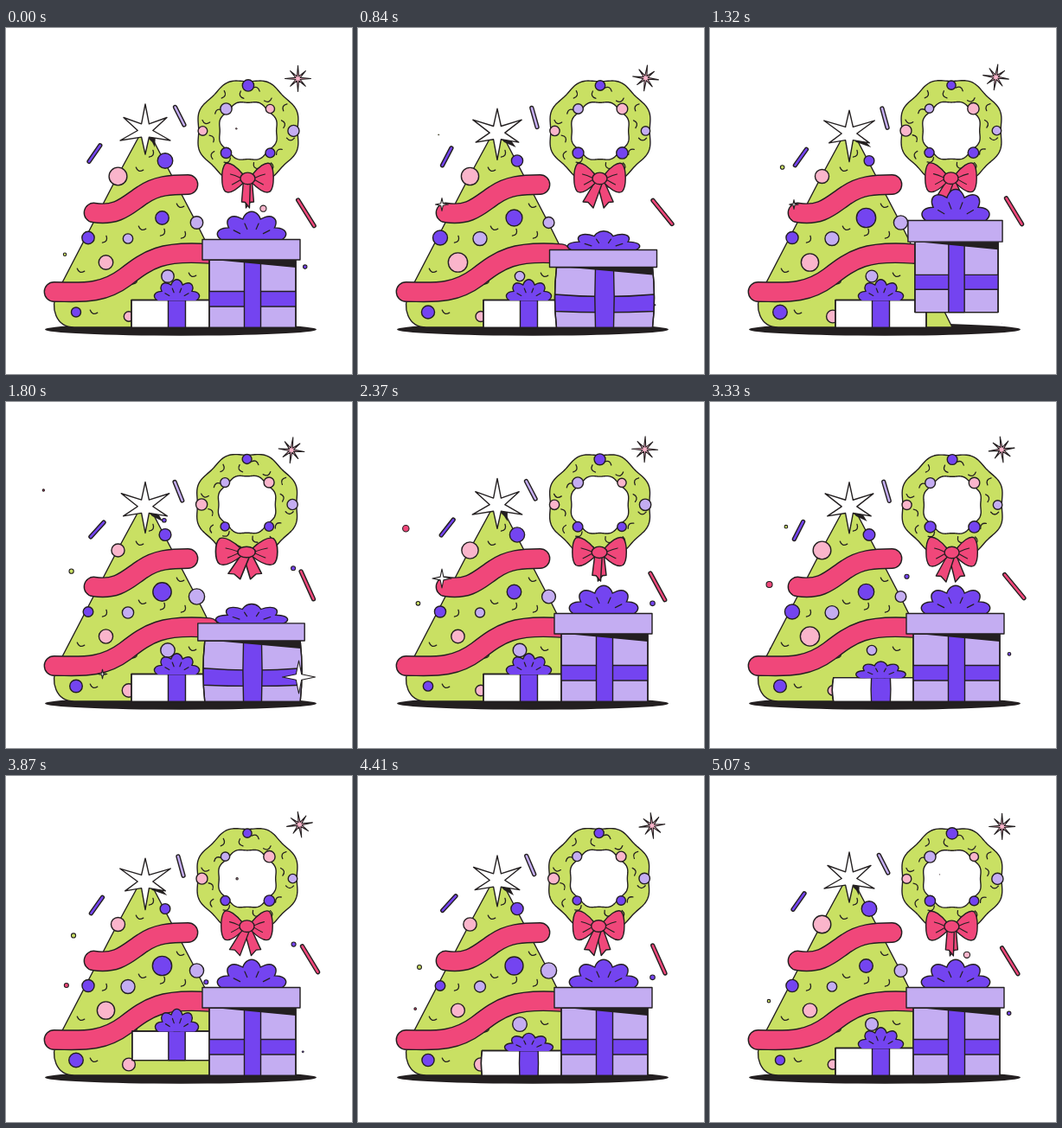
Recreate the animation shown at these times as an HTML page with a canvas. Size 400x400 px, loop 5.1 s.

```html
<!DOCTYPE html>
<html lang="en">
<head>
<meta charset="utf-8">
<title>Christmas tree, wreath and gifts</title>
<style>
html, body { margin: 0; width: 100%; height: 100%; overflow: hidden; background: #fff; }
canvas { display: block; width: 400px; height: 400px; }
</style>
</head>
<body>
<canvas id="stage"></canvas>
<script>
const LOOP = 5100, SWAY = LOOP / 2, TAU = Math.PI * 2;
const INK = '#231f20', GREEN = '#c9e063', PINK = '#f0477a', ROSE = '#fab5cb',
      LILAC = '#c4adf2', VIOLET = '#7444f0', WHITE = '#fff';

const canvas = document.getElementById('stage');
const ctx = canvas.getContext('2d');
const ratio = window.devicePixelRatio || 1;
canvas.width = canvas.height = 400 * ratio;

const mix = (a, b, k) => a + (b - a) * k;
const rad = deg => deg * Math.PI / 180;

// Swings around a middle value; peak is the share of the sway at which it is highest.
const swing = (t, mid, amp, peak) => mid + amp * Math.cos(TAU * (t / SWAY - peak));

// Rises smoothly from 0 to 1 at the peak and back.
function bump(t, peak, half) {
  const u = (t - peak) / half;
  return Math.abs(u) < 1 ? Math.cos(u * Math.PI / 2) ** 2 : 0;
}

function paint(path, fill, width = 1.4) {
  if (fill) { ctx.fillStyle = fill; ctx.fill(path, 'evenodd'); }
  if (width) { ctx.strokeStyle = INK; ctx.lineWidth = width; ctx.stroke(path); }
}
const shape = (d, fill, width) => paint(new Path2D(d), fill, width);

function oval(x, y, rx, ry, fill, width, turn = 0) {
  const p = new Path2D();
  p.ellipse(x, y, rx, ry, turn, 0, TAU);
  paint(p, fill, width);
}
const ball = (x, y, r, fill, width) => oval(x, y, r, r, fill, width);

function poly(points, fill, width) {
  const p = new Path2D();
  points.forEach(([x, y]) => p.lineTo(x, y));
  p.closePath();
  paint(p, fill, width);
}

// A thick rounded line with an outline.
function tube(d, width, color) {
  const p = new Path2D(d);
  ctx.strokeStyle = INK; ctx.lineWidth = width + 1.4; ctx.stroke(p);
  ctx.strokeStyle = color; ctx.lineWidth = width - 1.4; ctx.stroke(p);
}

// A small bent stroke.
function nick(x, y, turn) {
  ctx.save();
  ctx.translate(x, y);
  ctx.rotate(rad(turn));
  shape('M-4.5,-1.5 Q0,4 4.5,-1.5', null, 1.3);
  ctx.restore();
}

// Each dot falls, slows, drifts to one side and swells once.
const FALL = 3200;
function dot(t, start, x, y, drift, color, size) {
  const u = ((t - start + LOOP) % LOOP) / FALL;
  if (u >= 1) return;
  const r = size * Math.sin(Math.PI * u ** .6);
  ball(x + drift * Math.sin(Math.PI * .8 * u), y + 195 * u * (1.35 - .35 * u), r, color, Math.min(1.1, r));
}
function dots(t) {
  for (const s of [1250, 3290]) dot(t, s, 322, 149, 24, VIOLET, 2.8);
  for (const s of [800, 3030]) dot(t, s, 94, 120, -26, GREEN, 2.6);
  for (const s of [3800, 5060]) dot(t, s, 265, 113, 38, ROSE, 3.7);
  dot(t, 1740, 42, 97, 28, PINK, 4);
  dot(t, 1350, 178, 101, 14, VIOLET, 2.8);
  dot(t, 2500, 219, 138, 14, VIOLET, 2.6);
}

function stick(x, y, turn, half, color) {
  const dx = Math.cos(rad(turn)) * half, dy = Math.sin(rad(turn)) * half;
  tube(`M${x - dx},${y - dy} L${x + dx},${y + dy}`, 3.9, color);
}
function sticks(t) {
  stick(swing(t, 103.6, 2, .65), swing(t, 147.3, 2.3, .47), swing(t, -55.5, 8, .75), 11.3, VIOLET);
  stick(swing(t, 201.5, 2.5, .3), swing(t, 102.9, 1.2, .5), swing(t, 69, 6.5, .43), 11.5, LILAC);
  stick(swing(t, 349.3, 3, .4), swing(t, 212.8, 1.2, .1), swing(t, 58, 8, .75), 17.5, PINK);
}

function starPoints(x, y, count, outer, inner, spin = 0) {
  return Array.from({ length: count * 2 }, (_, i) => {
    const r = i % 2 ? inner : outer(i / 2), a = spin - Math.PI / 2 + i * Math.PI / count;
    return [x + r * Math.cos(a), y + r * Math.sin(a)];
  });
}

// Circles slowly once per loop.
function burst(t) {
  const x = 335 - 5 * Math.cos(TAU * (t - 1700) / LOOP);
  const y = 56.5 + 2 * Math.cos(TAU * (t - 200) / LOOP);
  const spin = .15 * Math.sin(TAU * t / LOOP);
  poly(starPoints(x, y, 8, i => i % 2 ? 12.5 : 15, 2.8, spin), ROSE, 1.1);
}

function twinkle(t, x, y, peak, half, size) {
  const r = size * Math.sqrt(bump(t, peak, half));
  if (r) poly(starPoints(x, y, 4, () => r, r * .24), WHITE, 1.1);
}
function twinkles(t) {
  for (const peak of [1050, 2370]) twinkle(t, 97, 204, peak, 400, 11);
  twinkle(t, 111.5, 314.5, 1950, 250, 9);
  twinkle(t, 338.5, 318, 1800, 400, 19);
}

function addRing(path, r, wave) {
  const ring = new Path2D();
  for (let i = 0; i < 160; i++) {
    const a = TAU * i / 160, d = r - wave * Math.cos(8 * a);
    ring.lineTo(d * Math.cos(a), d * Math.sin(a));
  }
  ring.closePath();
  path.addPath(ring);
}

function bow(t) {
  const wide = 1 + .2 * bump(t, 1800, 350) + .05 * bump(t, 2370, 180);
  const open = Math.min(1, (1 - swing(t, .1, .9, 0)) / 1.4);
  ctx.save();
  ctx.translate(-.5, 55);
  ctx.scale(wide, 1 - (wide - 1) * .4);
  for (const side of [1, -1]) {
    const k = open * (side > 0 ? .7 : 1);
    const x = (shut, spread) => side * mix(shut, spread, k);
    poly([[side * 5, 3], [x(7, 20), 27], [x(3, 14), 27.5], [x(-2, 8), 34], [-side * 3, 5]], PINK);
  }
  for (const side of [-1, 1]) {
    ctx.save();
    ctx.scale(side, 1);
    shape('M5,-4 C12,-13 21,-20 26,-17 C31,-11 31,10 26,15 C20,19 11,11 5,5 Z', PINK);
    shape('M9,-1 Q15,-4 20,-5 M9,2 Q14,5 18,7', null, 1.1);
    ctx.restore();
  }
  oval(0, 0, 8.5, 6.8, PINK);
  ctx.restore();
}

function wreath(t) {
  ctx.save();
  ctx.translate(swing(t, 279.5, .9, .17), swing(t, 118.8, .3, .17));
  const body = new Path2D();
  addRing(body, 59, 1.8);
  addRing(body, 33.8, 1.1);
  paint(body, GREEN);
  for (let i = 0; i < 16; i++) {
    const a = (i + .5) * TAU / 16, r = i % 2 ? 42 : 50;
    nick(r * Math.cos(a), r * Math.sin(a), i * 137);
  }
  const colors = [VIOLET, ROSE, LILAC, VIOLET, null, VIOLET, ROSE, LILAC];
  colors.forEach((color, i) => {
    const a = i * TAU / 8, r = i % 2 ? 36 : 52.5;
    if (color) ball(r * Math.sin(a), -r * Math.cos(a), swing(t, 5.9, .8, .05 + i * .43), color);
  });
  bow(t);
  ctx.restore();
}

// x, y, colour, middle radius; listed in the order in which they swell.
const BAUBLES = [
  [184, 153.5, VIOLET, 7.3], [129.5, 171.5, ROSE, 9.3], [95, 242.5, VIOLET, 7.2], [115.5, 271, ROSE, 9.3],
  [141, 243.5, LILAC, 6.9], [81, 328.5, VIOLET, 6.9], [180.5, 219.5, VIOLET, 9.4], [142, 333.5, ROSE, 6.5],
  [220.5, 225, LILAC, 7.6], [187, 287, LILAC, 7]
];

function topStar(t) {
  const k = swing(t, .4, 1, 0) / 1.4;
  const y = (high, low) => mix(low, high, k);
  const cx = 161, cy = y(118.5, 121);
  poly([[163, 126], [173, 124], [mix(182, 172, k), 138], [169, 132]], INK, 0);
  const side = [[mix(28, 25, k), y(103.5, 106)], [mix(25, 29, k), y(130, 132)]];
  const tips = [[0, y(88, 93)], ...side, [0, y(146, 152)], ...side.map(([dx, h]) => [-dx, h]).reverse()];
  poly(tips.flatMap(([dx, h], i) => {
    const a = (i - 1) * TAU / 6;
    return [[cx + dx, h], [cx + 8.8 * Math.cos(a), cy + 8.8 * Math.sin(a)]];
  }), WHITE);
}

function tree(t) {
  shape('M161,112 L129,171 L60,304 C50,324 58,346 79,346 H280 L220,225 Z', GREEN);
  const marks = [[154, 164], [169, 146], [201, 206], [115, 245], [157, 232], [182, 237],
    [86, 281], [206, 240], [101, 329], [150, 293], [215, 286]];
  marks.forEach(([x, y], i) => nick(x, y, i % 2 ? -60 : 20));
  BAUBLES.forEach(([x, y, color, r], i) =>
    ball(x, y, swing(t, r, r * .2, .78 * (i / 9) ** .75), color));
  tube('M101.5,213.5 C130,218 141,204 158,193 C174,182 190,181 210.5,181', 22.4, PINK);
  tube('M55.5,305 C85,305 110,309 138,288 C165,267 180,257 235,261', 22.4, PINK);
  topStar(t);
}

// Crouch, jump, land and settle.
const hop = t => ({
  squash: bump(t, 835, 290) + 1.1 * bump(t, 1725, 310) - .35 * bump(t, 1310, 230),
  lift: 18 * bump(t, 1310, 230)
});

// Five petals fanned out above a base.
function cluster(x, y, w, h) {
  const petals = new Path2D(), lines = new Path2D();
  for (let i = -2; i <= 2; i++) {
    const a = rad(i * 38), sx = Math.sin(a), sy = -Math.cos(a);
    const petal = new Path2D();
    petal.ellipse(.57 * sx, .57 * sy, .26, .43, a, 0, TAU);
    petals.addPath(petal, new DOMMatrix([w, 0, 0, h, x, y]));
    if (i) {
      const b = rad((i - Math.sign(i) / 2) * 38);
      lines.moveTo(x + .62 * w * Math.sin(b), y - .62 * h * Math.cos(b));
      lines.lineTo(x + .4 * w * Math.sin(b), y - .4 * h * Math.cos(b));
    }
  }
  ctx.save();
  ctx.beginPath();
  ctx.rect(0, 0, 400, y + .5);
  ctx.clip();
  paint(petals, null, 2.8);
  ctx.fillStyle = VIOLET;
  ctx.fill(petals);
  oval(x, y, w * .35, h * .4, VIOLET, 0);
  paint(lines, null, 1.2);
  ctx.restore();
}

// Body with bulging sides and its upright band.
function box(x, half, top, bottom, bulge, band, fill, cross) {
  const mid = (top + bottom) / 2;
  const sides = (h, b) => `M${x - h},${top} Q${x - h - b},${mid} ${x - h},${bottom} H${x + h} Q${x + h + b},${mid} ${x + h},${top} Z`;
  const body = new Path2D(sides(half, bulge));
  paint(body, fill);
  if (cross) {
    ctx.save();
    ctx.clip(body);
    const [y, h, sag] = cross, l = x - half - 2, r = x + half + 2;
    shape(`M${l},${y} Q${x},${y + sag} ${r},${y} V${y + h} Q${x},${y + h + sag / 2} ${l},${y + h} Z`, VIOLET);
    ctx.restore();
  }
  shape(sides(band, bulge * .35), VIOLET);
  paint(body, null);
}

function smallGift(t) {
  const { squash: s, lift } = hop(t - SWAY);
  ctx.save();
  ctx.translate(0, -lift);
  const top = mix(314.5, 319, s);
  box(197.5, mix(52.5, 55, s), top, 346.5, Math.max(0, s) * 3, mix(10, 11, s), WHITE);
  cluster(197.5, top, mix(26, 29, s), mix(23, 17.5, s));
  ctx.restore();
}

function bigGift(t) {
  const { squash: s, lift } = hop(t);
  ctx.save();
  ctx.translate(0, -lift);
  const top = mix(244.5, 256.5, s), under = top + mix(23.5, 20, s);
  const half = mix(50, 55.5, s), wide = mix(56.5, 62, s), sag = Math.max(0, s);
  box(285, half, under, 346.5, sag * 4, mix(9.5, 10.5, s), LILAC, [mix(304.5, 308, s), mix(17.5, 19.5, s), sag * 5]);
  poly([[240, under], [285 + half, under], [285 + half, under + 9]], INK, 0);
  cluster(284, top, mix(40, 42, s), mix(31.5, 21, s));
  const lid = new Path2D();
  lid.rect(283.5 - wide, top, wide * 2, under - top);
  paint(lid, LILAC);
  ctx.restore();
}

function draw(t) {
  ctx.setTransform(ratio, 0, 0, ratio, 0, 0);
  ctx.fillStyle = WHITE;
  ctx.fillRect(0, 0, 400, 400);
  ctx.lineCap = ctx.lineJoin = 'round';
  oval(202, 348.5, 157, 7.2, INK, 0);
  for (const layer of [dots, wreath, sticks, burst, tree, smallGift, bigGift, twinkles]) layer(t);
}

const begin = performance.now();
function tick() {
  draw((performance.now() - begin) % LOOP);
  requestAnimationFrame(tick);
}
tick();
</script>
</body>
</html>
```
